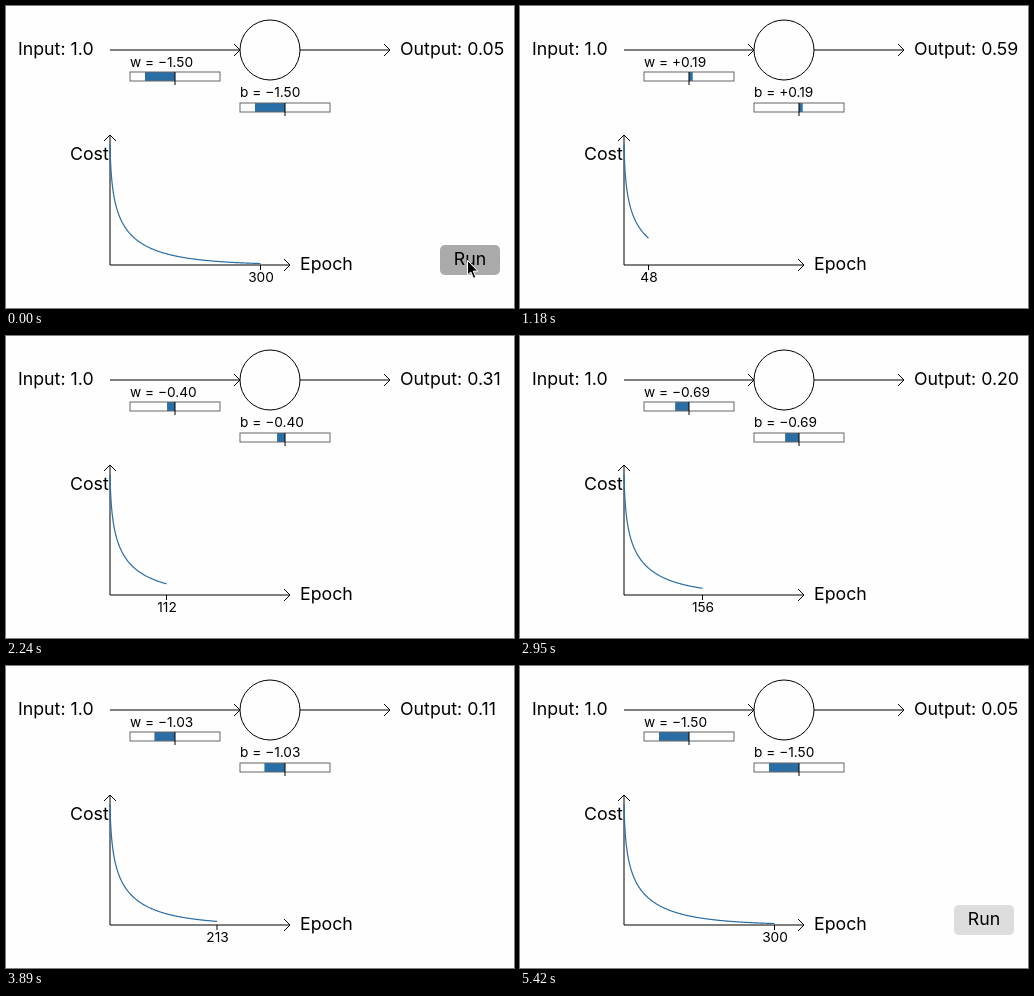
An HTML page that plays this animation: 508 by 302 pixels, repeating every 5870 ms.

```html
<!DOCTYPE html>
<html lang="en">
<head>
<meta charset="utf-8">
<title>Single neuron training</title>
<style>
  html, body { margin: 0; width: 100%; height: 100%; overflow: hidden; background: #fefefe; }
  svg { display: block; }
  text { font: 17.75px Inter, "Liberation Sans", sans-serif; fill: #000; }
  .small { font-size: 13.7px; }
  .line { fill: none; stroke: #000; }
  .box { fill: none; stroke: #666; }
  .bar { fill: #2a6ea6; }
  #curve { fill: none; stroke: #2a6ea6; stroke-width: 1.2; }
</style>
</head>
<body>
<svg width="508" height="302" viewBox="0 0 508 302">
  <path class="line" d="M104 44H234M228 38L234 44L228 50M294 44H384M378 38L384 44L378 50"/>
  <circle class="line" cx="264" cy="44" r="30"/>
  <path class="line" d="M104 259V129M98 135L104 129L110 135M104 259H284M278 253L284 259L278 265"/>
  <path id="curve"/>
  <path id="mark" class="line"/>
  <g transform="translate(124 66)">
    <rect class="bar" height="9"/>
    <rect class="box" width="90" height="9"/>
    <path class="line" d="M45 0V13"/>
  </g>
  <g transform="translate(234 97)">
    <rect class="bar" height="9"/>
    <rect class="box" width="90" height="9"/>
    <path class="line" d="M45 0V13"/>
  </g>
  <text x="12" y="49">Input: 1.0</text>
  <text x="394" y="49" id="output"></text>
  <text x="64" y="154">Cost</text>
  <text x="294" y="264">Epoch</text>
  <text x="124" y="61" class="small" id="weight"></text>
  <text x="234" y="91" class="small" id="bias"></text>
  <text y="276" class="small" id="count" text-anchor="middle"></text>
  <g id="button">
    <rect id="face" x="434" y="239" width="60" height="30" rx="5"/>
    <text x="464" y="259" text-anchor="middle">Run</text>
  </g>
  <path id="cursor" d="M0 0V14.5L3.3 11.5L6 17.8L8.4 16.8L5.7 10.6H10.3Z" stroke="#fff"/>
</svg>
<script>
const LOOP = 5870, START = 470, STEP = 117.857, LAST = 42, EPOCHS = 300;
const $ = id => document.getElementById(id);
const bars = document.querySelectorAll(".bar");

// Weight and bias start equal and receive the same update each epoch.
const weights = [2];
for (let i = 0; i <= EPOCHS; i++) {
  weights.push(weights[i] - 0.005 * (1 + Math.exp(2 * weights[i])));
}
const points = weights.map((w, i) =>
  `${104 + i / 2},${(259 - 30 * Math.log(1 + Math.exp(2 * w))).toFixed(2)}`);

const signed = v => (v < 0 ? "\u2212" : "+") + Math.abs(v).toFixed(2);

function draw(time) {
  const t = time % LOOP;
  const step = Math.floor((t - START + 4) / STEP);
  const pressed = step < 0;
  const done = pressed || step >= LAST;
  const epoch = done ? EPOCHS : Math.floor(5.06 + 7.19 * step);
  const w = weights[epoch + 1];
  const x = 104.5 + epoch / 2;

  $("output").textContent = "Output: " + (1 / (1 + Math.exp(-2 * w))).toFixed(2);
  $("weight").textContent = "w = " + signed(w);
  $("bias").textContent = "b = " + signed(w);
  for (const bar of bars) {
    bar.setAttribute("x", 45 + Math.min(0, 20 * w));
    bar.setAttribute("width", Math.abs(20 * w));
  }

  $("curve").setAttribute("d", "M" + points.slice(0, epoch + 2).join("L"));
  $("mark").setAttribute("d", `M${x} 259v5`);
  $("count").textContent = epoch;
  $("count").setAttribute("x", x + 0.5);

  $("button").style.display = done ? "" : "none";
  $("face").setAttribute("fill", pressed ? "#aaa" : "#ddd");

  // The pointer leaves through the bottom edge after the click.
  const drop = Math.max(0, step + 1) * 10;
  $("cursor").style.display = step < 5 ? "" : "none";
  $("cursor").setAttribute("transform", `translate(461.5 ${254.5 + drop})`);
}

const begin = performance.now();
function tick() {
  draw(performance.now() - begin);
  requestAnimationFrame(tick);
}
tick();
</script>
</body>
</html>
```
